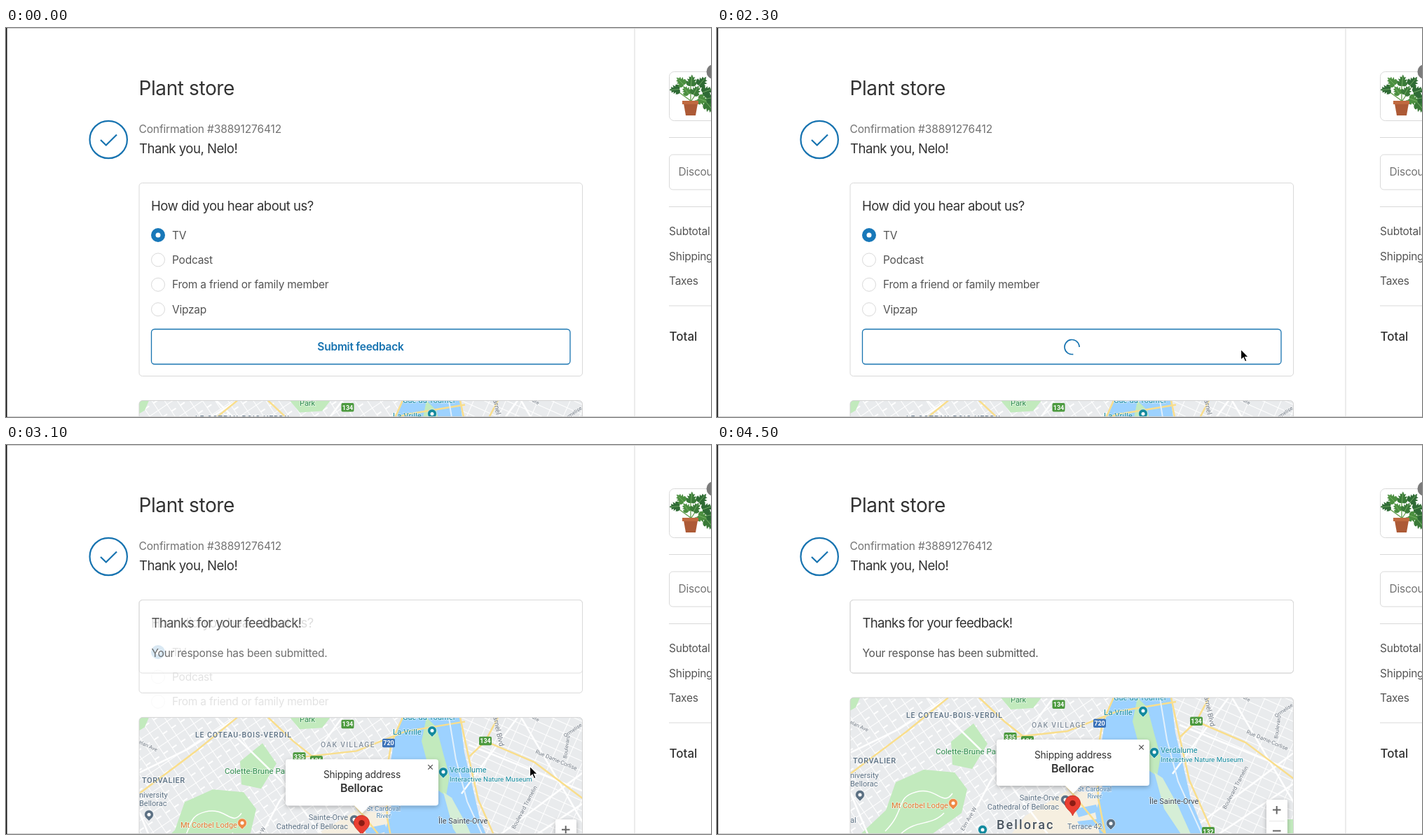
Write an HTML page that moves like this. It is 1006x556 px and loops after 4900 ms.

```html
<!DOCTYPE html>
<html lang="en">
<head>
<meta charset="utf-8">
<title>Order confirmation survey</title>
<style>
  html, body { margin: 0; width: 100%; height: 100%; overflow: hidden; background: #fff; }
  svg { display: block; }
  text { font: 15.5px Inter, sans-serif; letter-spacing: -.24px; fill: #545454; }
  .title { font-size: 28px; letter-spacing: -.4px; fill: #333; }
  .head { font-size: 18.6px; letter-spacing: -.52px; fill: #333; }
  .muted { fill: #737373; }
  .mid { text-anchor: middle; }
  .box { fill: #fff; stroke: #d9d9d9; }
  .rule { stroke: #d9d9d9; }
  .blue { fill: none; stroke: #1773b0; }
  #map text { font-family: Roboto, sans-serif; letter-spacing: 0; paint-order: stroke; stroke: #fff9; stroke-width: 1.6px; }
  #map .pop text { font-family: Inter, sans-serif; letter-spacing: -.2px; stroke: none; fill: #333; }
</style>
</head>
<body>
<svg width="1006" height="556" viewBox="0 0 1006 556">
  <defs>
    <pattern id="west" width="15" height="24" patternUnits="userSpaceOnUse" patternTransform="rotate(-34)">
      <path d="M0 0V24M0 0H15M0 12H8" stroke="#fff" stroke-width="2" fill="none"/>
    </pattern>
    <pattern id="east" width="21" height="13" patternUnits="userSpaceOnUse" patternTransform="rotate(24)">
      <path d="M0 0V13M0 0H21" stroke="#fff" stroke-width="2" fill="none"/>
    </pattern>
    <clipPath id="mapClip"><rect x="190" y="361" width="633" height="330" rx="5"/></clipPath>
    <clipPath id="photoClip"><rect x="947" y="63" width="90" height="69" rx="7"/></clipPath>
    <filter id="shadow" x="-20%" y="-20%" width="140%" height="150%">
      <feDropShadow dx="0" dy="2" stdDeviation="3" flood-opacity=".28"/>
    </filter>
  </defs>

  <rect width="1006" height="556" fill="#fff"/>
  <text class="title" x="189.500" y="96">Plant store</text>
  <circle class="blue" cx="146.200" cy="159.500" r="26.700" stroke-width="2.200"/>
  <path class="blue" d="M135 160l7.800 7.500L158 152.500" stroke-width="2.200"/>
  <text class="muted" x="189.500" y="150" style="letter-spacing:-.13px">Confirmation #38891276412</text>
  <text class="head" x="190" y="178.500">Thank you, Nelo!</text>

  <rect id="card" class="box" x="190" y="221.500" width="632.500" height="276" rx="4.500"/>
  <g id="form">
    <text class="head" x="207" y="260.500">How did you hear about us?</text>
    <g id="options"></g>
    <rect class="blue" x="207.500" y="430.500" width="597.500" height="50" rx="4.500" stroke-width="1.300"/>
    <text id="submit" class="mid" x="506" y="460.500" style="font-weight:600;fill:#1773b0">Submit feedback</text>
    <circle id="spinner" class="blue" cx="506.500" cy="456" r="10.500" stroke-width="1.700" pathLength="360" stroke-dasharray="280 80"/>
  </g>
  <g id="thanks">
    <rect x="190" y="221.500" width="632.500" height="104.500" rx="4.500" fill="none" stroke="#d9d9d9"/>
    <text class="head" x="207.500" y="260.500" style="letter-spacing:-.7px">Thanks for your feedback!</text>
    <text x="207.500" y="302.500">Your response has been submitted.</text>
  </g>

  <g id="map">
    <g clip-path="url(#mapClip)">
      <rect x="190" y="361" width="633" height="330" fill="#e9ebed"/>
      <rect x="190" y="361" width="380" height="330" fill="url(#west)"/>
      <rect x="640" y="361" width="183" height="330" fill="url(#east)"/>
      <path d="M440 530l60-36 45 4 4 58H420z" fill="#f6efe0"/>
      <g fill="#c2eabd">
        <path d="M405 361h58l-12 15-32 2z"/>
        <path d="M334 424l32-26 20 29-22 36-28-6z"/>
        <path d="M205 556l36-34 14-40 40-18 44 4 18 24-8 34-42 30z"/>
        <path d="M188 361h16l-6 14-10 6z"/>
        <path d="M806 535h17v21h-27z"/>
      </g>
      <path d="M240 552c30-30 14-48 44-56s38 22 52 2M262 556c24-22 42-10 62-30" fill="none" stroke="#fff" stroke-width="1.500"/>
      <path d="M566 361h82l6 50 12 50 10 45 20 50H546l-6-30 10-34-4-50 8-50z" fill="#9dd2ff"/>
      <path d="M600 361l14 14 10 38 9 32-5 28-15-10-11-34-9-34z" fill="#c2eabd"/>
      <path d="M624 468l12 8 22 40 18 40h-14l-24-36z" fill="#d5eed6"/>
      <path d="M511 520l30-6 3 10-28 8zM514 538l34-4 2 8-30 6z" fill="#9dd2ff"/>
      <g fill="none" stroke="#fff" stroke-width="2.500">
        <path d="M190 440l70-34 70-45M215 556l-25-60M300 361l92 90 80 105M480 361l-90 120-40 75"/>
        <path d="M650 470l80-109M660 400l163 66M690 540l133-100M735 361l88 150M716 556l107-72"/>
      </g>
      <g fill="none" stroke="#f9de8c" stroke-width="2.500">
        <path d="M190 470l80-60 60-49M374 361l36 34 30 24 60 70 54 67M410 419l90-10 70-28 85-14"/>
        <path d="M566 361l-16 36-8 48 2 60 10 51M648 361l12 56 14 62 34 77M660 418l24-23 18-34M684 395l70 30 69 52"/>
      </g>
      <path d="M632 361l10 60 16 60 34 75" fill="none" stroke="#e2f0fb" stroke-width="2"/>
      <g id="labels"></g>
      <g class="pop">
        <rect x="784" y="507" width="30" height="60" rx="2" fill="#fff" filter="url(#shadow)"/>
        <path d="M793 521.500h11.500M798.700 516v11.500M793 551.500h11.500" stroke="#666" stroke-width="2"/>
        <path d="M788 537.500h22" stroke="#e6e6e6"/>
        <path d="M507.500 530c-2-7-11-10-11-18a11 11 0 0 1 22 0c0 8-9 11-11 18z" fill="#ea3f32" stroke="#c5281c" stroke-width=".8"/>
        <circle cx="507.500" cy="512" r="4.300" fill="#8c1c14"/>
        <path d="M403 421h210q4 0 4 4v58q0 4-4 4h-94l-11 11-11-11h-94q-4 0-4-4v-58q0-4 4-4z" fill="#fff" filter="url(#shadow)"/>
        <text class="mid" x="508" y="447.500" style="font-size:13.800px">Shipping address</text>
        <text class="mid" x="507.500" y="467.500" style="font-size:16px;font-weight:600">Bellorac</text>
        <path d="M602.300 428.800l6.500 6.500m0-6.500l-6.500 6.500" stroke="#444" stroke-width="1.100"/>
      </g>
    </g>
    <rect x="190" y="361" width="632.500" height="330" rx="5" fill="none" stroke="#d3d3d3"/>
  </g>

  <path class="rule" d="M897 0V556M946 156.500h60M946 255.500h60M946 397h60"/>
  <rect class="box" x="946.500" y="62.500" width="90" height="70" rx="7"/>
  <g clip-path="url(#photoClip)">
    <path d="M977 106V80M977 104L955 88M978 104l16-24M978 106l22-8" stroke="#5f9a48" stroke-width="1.300" fill="none"/>
    <g id="leaves"></g>
    <path d="M967 108h20l-3 17h-14z" fill="#ad5a36"/>
    <path d="M965 104h23v5h-23z" fill="#c0693f"/>
  </g>
  <circle cx="1010" cy="62.500" r="10.500" fill="#7b7b7b"/>
  <rect class="box" x="946.500" y="181" width="90" height="50" rx="5"/>
  <text class="muted" x="959.500" y="210.500">Discount code</text>
  <text x="946" y="296">Subtotal</text>
  <text x="946" y="331.500">Shipping</text>
  <text x="946" y="367">Taxes</text>
  <text x="946.500" y="447" style="font-size:17px;font-weight:500;fill:#333;letter-spacing:0">Total</text>
  <path d="M0 .5H1006M0 555.500H1006" stroke="#cfcfcf"/>
  <rect width="1.500" height="556" fill="#111"/>
  <path id="cursor" d="M0 0V15.500L3.600 12.200 6 17.800 8.600 16.700 6.200 11.300H11z" stroke="#fff" stroke-width="1.200"/>
</svg>
<script>
const $ = id => document.getElementById(id);
const clamp = x => Math.min(1, Math.max(0, x));
const smooth = x => x * x * (3 - 2 * x);
const set = (id, attr, value) => $(id).setAttribute(attr, value);

$('options').innerHTML = ['TV', 'Podcast', 'From a friend or family member', 'Vipzap'].map((name, i) => {
  const y = 296 + i * 35.4;
  const dot = i
    ? `<circle class="box" cx="217" cy="${y}" r="9.500"/>`
    : `<circle cx="217" cy="${y}" r="10" fill="#1878b9"/><circle cx="217" cy="${y}" r="3.500" fill="#fff"/>`;
  return `${dot}<text x="237" y="${y + 5.5}">${name}</text>`;
}).join('');

$('leaves').innerHTML = [
  [955, 88, -95, .75], [963, 77, -45, .75], [978, 76, 5, .8], [993, 77, 40, .8], [971, 90, -35, .7],
  [984, 90, 30, .75], [1000, 90, 70, .8], [994, 103, 110, .8], [1004, 112, 140, .9], [1006, 100, 80, .8]
].map(([x, y, turn, size], i) =>
  `<g transform="translate(${x} ${y}) rotate(${turn}) scale(${size})">
    <path d="M0 8C-5 11-11 7-9 0L-5 1-8-4-4-3-5-8-2-7 0-12 3-7 6-8 4-3 9-4 6 1 9 1C11 7 5 11 0 8z" fill="${['#2f6b35', '#4b8f40', '#3a7a38'][i % 3]}"/>
    <path d="M0 8V-9" stroke="#8cc078" stroke-width=".8"/></g>`).join('');

const teal = '#138a9e', slate = '#5b7083', green = '#2c8a4b', grey = '#6d7680';
const label = (text, x, y, color, size = 11, style = '', turn = 0) =>
  `<text transform="translate(${x} ${y}) rotate(${turn})" style="font-size:${size}px;fill:${color};${style}">${text}</text>`;
const pin = (x, y, color) =>
  `<path d="M${x} ${y + 9}l-5-5a6.500 6.500 0 1 1 10 0z" fill="${color}" stroke="#fff" stroke-width=".6"/>
   <circle cx="${x}" cy="${y}" r="2.500" fill="#fff"/>`;
const shield = (text, x, y, color = '#4c9a3f') =>
  `<rect x="${x}" y="${y}" width="18" height="12.500" rx="2" fill="${color}"/>
   <text class="mid" x="${x + 9}" y="${y + 9.5}" style="font-size:9px;font-weight:700;fill:#fff;stroke:none">${text}</text>`;
const caps = 'font-weight:500;letter-spacing:.5px', end = 'text-anchor:end', mid = 'text-anchor:middle';

$('labels').innerHTML = [
  label('Park', 419, 368, green),
  label('Gué-du-Tournel', 566, 364.5, teal),
  label('LE COTEAU-BOIS-VERDIL', 270, 390, slate, 10.5, 'font-weight:500;letter-spacing:.9px'),
  label('OAK VILLAGE', 449, 404, '#8793a0', 10.5, 'font-weight:500;letter-spacing:1.2px'),
  label('La Vrille', 552, 386, teal, 11.5),
  label('Colette-Brune Park', 312, 442, green, 11.5),
  label('TORVALIER', 194, 455, slate, 11, caps),
  label('niversity', 190, 476, slate),
  label('Bellorac', 190, 488, slate),
  label('al', 190, 540, slate),
  label('Mt Corbel Lodge', 249, 519, '#e0762b'),
  label('Sainte-Orve', 488, 508, slate, 11, end),
  label('Cathedral of Bellorac', 488, 521, slate, 11, end),
  label('Bellorac', 399, 549, '#4a5560', 18, 'font-weight:500;letter-spacing:2.1px'),
  label('Terrace 42', 500, 549, slate, 10.5),
  label('St Cardoval', 539, 494.5, '#4f86b5', 9.5, mid),
  label('River', 539, 504.5, '#4f86b5', 9.5, mid),
  label('Verdalume', 633, 440, teal),
  label('Interactive Nature Museum', 633, 452.5, teal, 9.8),
  label('Île Sainte-Orve', 617, 513, '#3c4650', 11),
  label('arnel Blvd', 695, 360, grey, 10, '', 78),
  label('Rue Dame-Corlise', 755, 412, grey, 8, '', 23),
  label('Boulevard Tramelin', 726, 521, grey, 8, '', -62),
  label('Boulevard', 800, 420, grey, 7.5, '', -82),
  label('Ormelise', 798, 390, grey, 7.5, '', -35),
  label('ute', 750, 362, grey, 7.5, '', 30),
  label('elan Ave', 189, 398, grey, 7.5, '', 25),
  label('Elm Ave W', 352, 552, grey, 8, '', -60),
  pin(608, 380, teal), pin(624, 439, teal), pin(204, 500, slate), pin(337, 512, '#ee8a45'),
  pin(497, 507, slate), pin(562, 541, slate), pin(379, 550, teal),
  shield('134', 478.5, 364.5), shield('134', 675, 388.5), shield('335', 409.5, 411),
  shield('136', 434, 416), shield('132', 692, 546), shield('720', 537, 391.5, '#3d73b9')
].join('');

// Pointer slides in, rests on the button, then leaves to the right.
function moveCursor(t) {
  const enter = 1 - clamp((t - 300) / 500), leave = clamp((t - 4200) / 300);
  const x = 747.5 + 270 * enter ** 2 + 270 * leave;
  const y = 459 + 100 * enter ** 2 + 60 * leave;
  set('cursor', 'transform', `translate(${x} ${y})`);
  set('cursor', 'visibility', t >= 400 && t < 4500 ? 'visible' : 'hidden');
}

function draw(t) {
  const busy = clamp((t - 1200) / 500);
  const fade = clamp((t - 2820) / 333);
  const shrink = 171.5 * smooth(clamp((t - 2755) / 465));
  set('submit', 'opacity', 1 - busy);
  set('spinner', 'opacity', busy);
  set('spinner', 'transform', `rotate(${80 + (t - 2300) * 360 / 640} 506.5 456)`);
  set('form', 'opacity', 1 - fade);
  set('thanks', 'opacity', fade);
  set('card', 'height', 276 - shrink);
  set('map', 'transform', `translate(0 ${171.5 - shrink})`);
  moveCursor(t);
}

const start = performance.now();
function tick() {
  const t = (performance.now() - start) % 4900;
  draw(Math.floor(t / 100) * 100); // the motion runs at ten steps a second
  requestAnimationFrame(tick);
}
tick();
</script>
</body>
</html>
```
